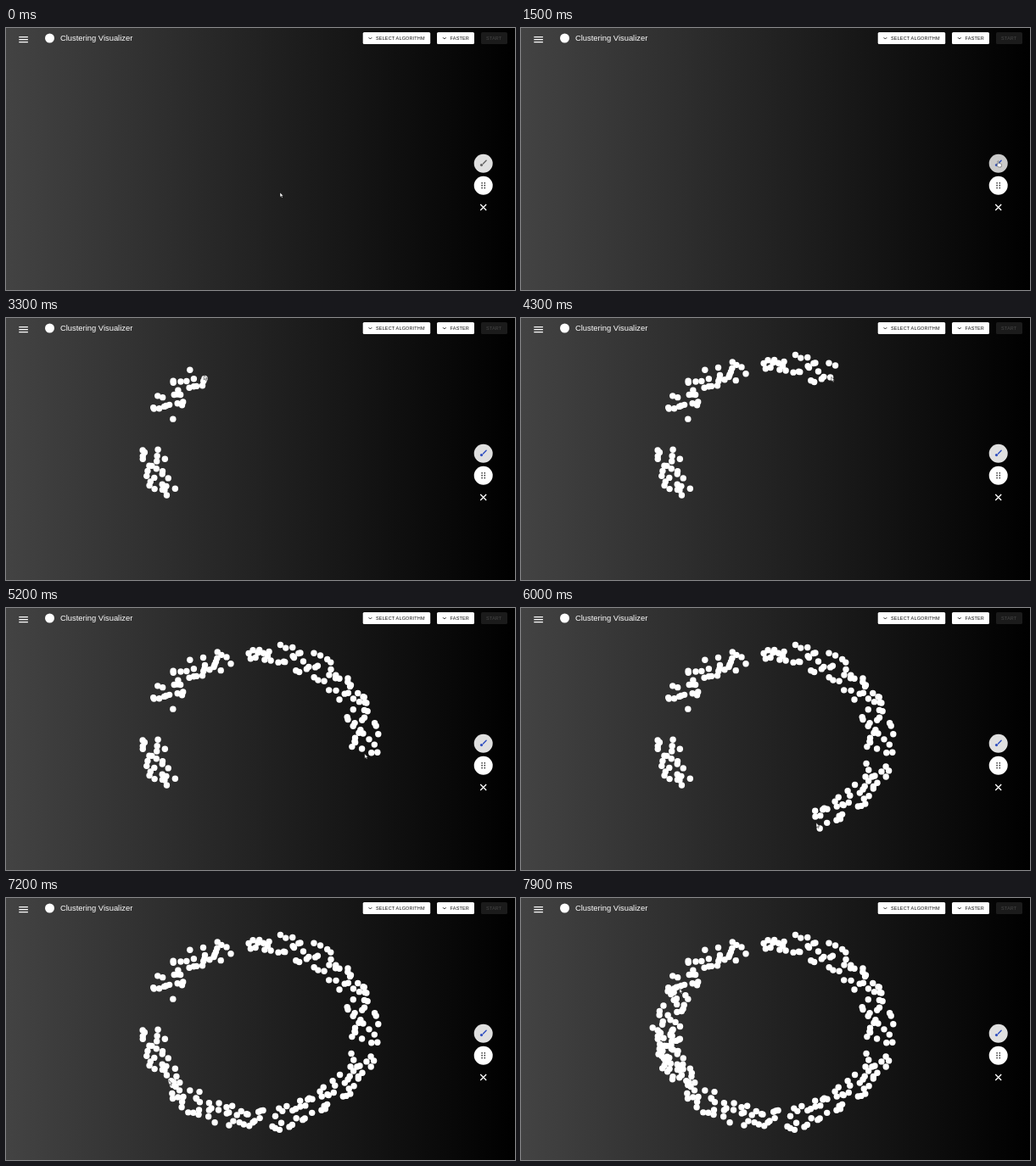
An HTML page for the animation above (8000 ms loop, 600x309 px).

```html
<!DOCTYPE html>
<html lang="en">
<head>
<meta charset="utf-8">
<title>Clustering Visualizer</title>
<style>
  html, body { margin: 0; width: 100%; height: 100%; overflow: hidden; background: #000; }
  svg { display: block; width: 100%; height: 100%; }
  text { font-family: "Liberation Sans", Arial, sans-serif; }
  .label { font-size: 5.5px; letter-spacing: .157px; }
</style>
</head>
<body>
<svg viewBox="0 0 600 309" preserveAspectRatio="none">
  <defs>
    <linearGradient id="bg"><stop stop-color="#434343"/><stop offset="1" stop-color="#000"/></linearGradient>
    <path id="chevron" d="M-1.8-1 0 .8 1.8-1" fill="none" stroke="#111" stroke-width=".9"/>
    <path id="pair" d="M-1.6 0v0M1.6 0v0" stroke="#333" stroke-width="1.7" stroke-linecap="round"/>
  </defs>
  <rect width="600" height="309" fill="url(#bg)"/>

  <path d="M15.3 10.7h10.6M15.3 13.7h10.6M15.3 16.7h10.6" stroke="#fff" stroke-width="1.3"/>
  <circle cx="51.5" cy="12" r="5.5" fill="#fff"/>
  <text x="64" y="15.3" font-size="9.38" fill="#fff">Clustering Visualizer</text>

  <g fill="#fff">
    <rect x="420.7" y="5" width="79.5" height="14" rx="1.6"/>
    <rect x="508" y="5" width="44" height="14" rx="1.6"/>
    <rect x="560" y="5" width="31" height="14" rx="1.6" fill="#1b1b1b"/>
  </g>
  <use href="#chevron" x="429.4" y="12.2"/>
  <use href="#chevron" x="516.8" y="12.2"/>
  <g class="label" fill="#111">
    <text x="436" y="14">SELECT ALGORITHM</text>
    <text x="523.6" y="14">FASTER</text>
    <text x="566" y="14" fill="#484848">START</text>
  </g>

  <g transform="translate(562.7 159.8)">
    <circle id="disc" r="11"/>
    <g id="brush">
      <path d="M3.4-3.6-.2.2" stroke-width="1.4" stroke-linecap="round"/>
      <circle cx="-2.2" cy="1.8" r="1.6" stroke="none"/>
    </g>
  </g>
  <g transform="translate(562.7 185.7)">
    <circle r="11" fill="#fff"/>
    <use href="#pair" y="-2.9"/>
    <use href="#pair"/>
    <use href="#pair" y="2.9"/>
  </g>
  <path d="m559.2 208 7 7m0-7-7 7" stroke="#fff" stroke-width="1.3"/>

  <g id="dots" fill="#fff"></g>
  <path id="arrow" d="M0 0V5.4L1.3 4.3 2.2 6.3 3.2 5.8 2.3 3.9H4z" fill="#fff" stroke="#111" stroke-width=".5"/>
  <path id="hand" d="M0 0c.7-.5 1.2 0 1.2.6v2l2.6.6c.6.2.8.6.7 1.2L4 7H.6L-1.5 4.3c0-.7.7-.7 1.5 0z"
        fill="#fff" stroke="#333" stroke-width=".5"/>
</svg>
<script>
const LOOP = 8000, STEP = 100, DENSITY = .8, SPREAD = .13;
const BUTTON = [562, 157], CLICK = 1500;
const $ = id => document.getElementById(id);
const [disc, brush, layer, arrow, hand] = ['disc', 'brush', 'dots', 'arrow', 'hand'].map($);

let seed = 11;
const rand = () => (seed = seed * 16807 % 2147483647) / 2147483647;
const lerp = (a, b, f) => a + (b - a) * f;
const progress = (t, from, to) => Math.min(1, Math.max(0, (t - from) / (to - from)));
const glide = (a, b, f) => a.map((v, i) => lerp(v, b[i], f));

// A point on the ring; scale 1 is the middle of the band.
function ring(deg, scale = 1) {
  const a = deg * Math.PI / 180;
  return [297.5 + 126.5 * scale * Math.cos(a), 157.5 + 104.5 * scale * Math.sin(a)];
}

// Brush strokes clockwise round the ring: start and end time, start and end angle
const strokes = [
  [2100, 2600, 150, 182], [2700, 2800, 204, 225], [3100, 3500, 225, 254],
  [3600, 3700, 264, 278], [4100, 4400, 280, 314], [4800, 5200, 315, 368],
  [5400, 6200, 374, 444], [6300, 6400, 446, 470], [6800, 7900, 471, 569]
];

// Scatter the dots evenly along each stroke, at random across the band.
const dots = strokes.flatMap(([t0, t1, a0, a1]) => {
  const count = Math.round((a1 - a0) * DENSITY);
  return Array.from({ length: count }, (_, i) => {
    const f = (i + rand()) / count;
    const [x, y] = ring(lerp(a0, a1, f), 1 + SPREAD * (2 * rand() - 1));
    const el = document.createElementNS('http://www.w3.org/2000/svg', 'circle');
    el.setAttribute('cx', x);
    el.setAttribute('cy', y);
    el.setAttribute('r', 3.7);
    layer.append(el);
    return { el, time: lerp(t0, t1, f) };
  });
});

function pointer(t) {
  if (t < CLICK) return glide([323, 194], BUTTON, progress(t, 0, 1200));
  const [first] = strokes;
  if (t < first[0]) return glide(BUTTON, ring(first[2]), progress(t, 1600, first[0]));
  const [t0, t1, a0, a1] = strokes.findLast(s => s[0] <= t);
  return ring(lerp(a0, a1, progress(t, t0, t1)));
}

function draw(now) {
  const t = Math.floor(now % LOOP / STEP) * STEP;
  const [x, y] = pointer(t);
  const over = Math.hypot(x - BUTTON[0], y - BUTTON[1]) < 10;
  for (const d of dots) d.el.setAttribute('visibility', d.time <= t ? 'visible' : 'hidden');
  const ink = t >= CLICK ? '#2f4fc0' : '#666';
  brush.setAttribute('fill', ink);
  brush.setAttribute('stroke', ink);
  disc.setAttribute('fill', over ? '#cacaca' : '#e0e0e0');
  for (const [el, shown] of [[arrow, !over], [hand, over]]) {
    el.setAttribute('transform', `translate(${x} ${y})`);
    el.setAttribute('visibility', shown ? 'visible' : 'hidden');
  }
}

const start = performance.now();
function tick() {
  draw(performance.now() - start);
  requestAnimationFrame(tick);
}
tick();
</script>
</body>
</html>
```
